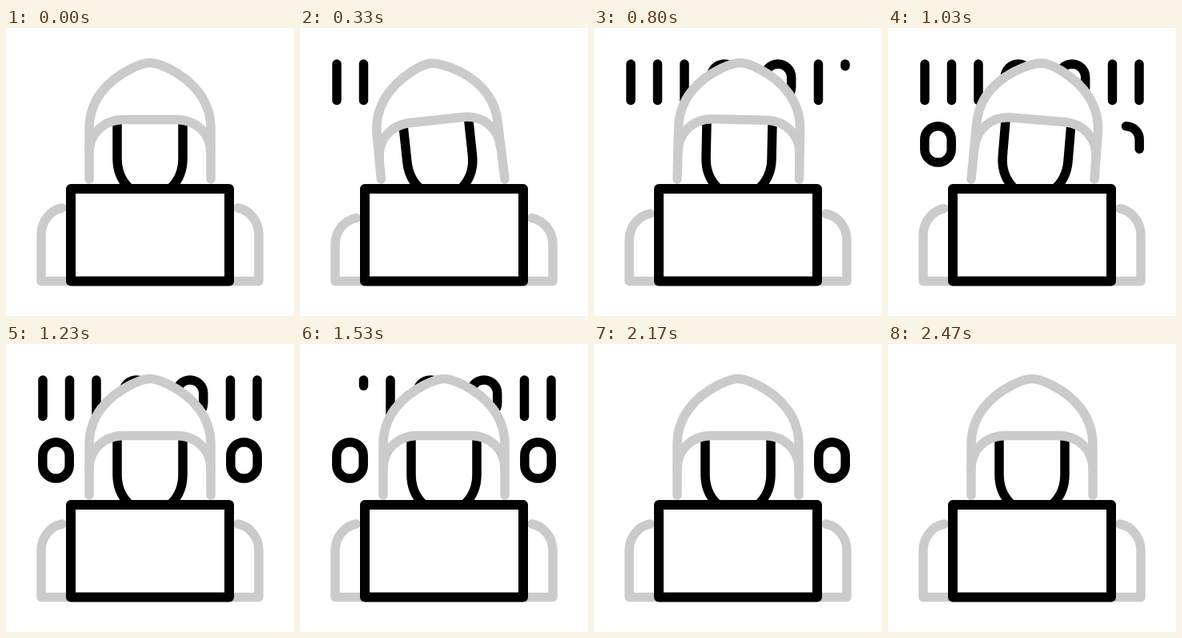
These frames come from a looping animation (360 by 360 pixels, 2.5 s). An HTML page with a canvas:

```html
<!DOCTYPE html>
<html lang="en">
<head>
<meta charset="utf-8">
<style>
  html, body { margin: 0; width: 100%; height: 100%; overflow: hidden; background: #fff; }
  canvas { display: block; width: 360px; height: 360px; }
</style>
</head>
<body>
<canvas id="stage" width="360" height="360"></canvas>
<script>
const ctx = document.getElementById('stage').getContext('2d');
const LOOP = 2500;
const BLACK = '#000', GRAY = '#cbcbcb';
const DRAW_TIME = 68;
const DIGIT_HEIGHT = 45.4;

const clamp = v => Math.max(0, Math.min(1, v));
const smooth = v => v * v * (3 - 2 * v);

// Eased value between [time, value] keys
function track(keys, t) {
  for (let i = 1; i < keys.length; i++) {
    const [t0, a] = keys[i - 1], [t1, b] = keys[i];
    if (t < t1) return a + (b - a) * smooth(clamp((t - t0) / (t1 - t0)));
  }
  return keys[keys.length - 1][1];
}

const TILT = [[70, 0], [580, -11.8], [930, 7], [1200, 0]];
const DROP = [[70, 0], [380, 13.5], [520, 13], [1120, 0]];

const RADIUS = 16.7;
const one = x => ({ x, top: 45, length: DIGIT_HEIGHT });
const zero = (x, top, turn) =>
  ({ x, top, turn, length: 2 * Math.PI * RADIUS + 2 * (DIGIT_HEIGHT - 2 * RADIUS) });

// turn: 1 is clockwise, -1 counterclockwise
const DIGITS = [
  one(46), one(79.5), one(113),
  zero(163, 45, -1), zero(230, 45, -1),
  one(280.5), one(314),
  zero(62.5, 122.7, -1), zero(297.5, 122.7, 1)
];

function stroke(color) {
  ctx.strokeStyle = color;
  ctx.stroke();
}

function drawDigit(d, shown) {
  if (shown <= 0) return;
  ctx.save();
  ctx.translate(d.x, d.top);
  ctx.beginPath();
  ctx.moveTo(0, 0);
  if (d.turn) {
    ctx.scale(d.turn, 1);
    ctx.arc(0, RADIUS, RADIUS, -Math.PI / 2, 0);
    ctx.arc(0, DIGIT_HEIGHT - RADIUS, RADIUS, 0, Math.PI);
    ctx.arc(0, RADIUS, RADIUS, Math.PI, Math.PI * 1.5);
  } else {
    ctx.lineTo(0, DIGIT_HEIGHT);
  }
  if (shown < 1) ctx.setLineDash([d.length * shown, d.length * 2]);
  stroke(BLACK);
  ctx.restore();
}

function drawShoulder(side, drop) {
  const x = v => 180 + side * v;
  ctx.beginPath();
  ctx.moveTo(x(110), 225 + drop);
  ctx.bezierCurveTo(x(124), 227.5 + drop, x(136), 241 + drop, x(136), 258 + drop);
  ctx.lineTo(x(136), 316.5);
  ctx.lineTo(x(104), 316.5);
  stroke(GRAY);
}

// Rotates points around the neck, then slides them sideways
function leaning(degrees, shift) {
  const a = degrees * Math.PI / 180, c = Math.cos(a), s = Math.sin(a);
  return (x, y) => {
    const dx = x - 180, dy = y - 190;
    return [180 + dx * c - dy * s + shift, 190 + dx * s + dy * c];
  };
}

function drawHead(tilt) {
  const p = leaning(tilt, tilt * 0.24);
  const f = leaning(tilt, tilt * 0.4);
  const leftEnd = 104 + Math.min(0, tilt) * 0.42;
  const rightEnd = 256 + Math.max(0, tilt) * 0.42;

  const hood = new Path2D();
  hood.moveTo(leftEnd, 189);
  hood.lineTo(...p(104, 126));
  hood.bezierCurveTo(...p(104, 91), ...p(126, 66), ...p(156, 51));
  hood.bezierCurveTo(...p(165, 46.5), ...p(172, 43.5), ...p(180, 43.5));
  hood.bezierCurveTo(...p(188, 43.5), ...p(195, 46.5), ...p(204, 51));
  hood.bezierCurveTo(...p(234, 66), ...p(256, 91), ...p(256, 126));
  hood.lineTo(rightEnd, 189);
  ctx.fillStyle = '#fff';
  ctx.fill(hood);

  ctx.lineCap = 'butt';
  for (const side of [-1, 1]) {
    const q = (x, y) => f(180 + side * x, y);
    ctx.beginPath();
    ctx.moveTo(...q(41, 116));
    ctx.lineTo(...q(41, 163));
    ctx.bezierCurveTo(...q(41, 178), ...q(36, 190), ...q(27, 199));
    ctx.lineTo(...q(18, 208));
    stroke(BLACK);
  }
  ctx.lineCap = 'round';

  ctx.strokeStyle = GRAY;
  ctx.stroke(hood);
  ctx.beginPath();
  ctx.moveTo(...p(104, 156));
  ctx.bezierCurveTo(...p(104, 132.5), ...p(122, 114.5), ...p(147, 114.5));
  ctx.lineTo(...p(213, 114.5));
  ctx.bezierCurveTo(...p(238, 114.5), ...p(256, 132.5), ...p(256, 156));
  stroke(GRAY);
}

function drawLaptop() {
  ctx.beginPath();
  ctx.rect(81, 201, 198, 115.5);
  ctx.fillStyle = '#fff';
  ctx.fill();
  ctx.lineWidth = 12;
  stroke(BLACK);
}

function render(t) {
  ctx.fillStyle = '#fff';
  ctx.fillRect(0, 0, 360, 360);
  ctx.lineWidth = 11.5;
  ctx.lineCap = ctx.lineJoin = 'round';

  DIGITS.forEach((d, i) => {
    const drawn = clamp((t - 155 - i * 107) / DRAW_TIME);
    const erased = clamp((t - 1374 - i * 100) / DRAW_TIME);
    drawDigit(d, drawn * (1 - erased));
  });

  const drop = track(DROP, t);
  drawShoulder(-1, drop);
  drawShoulder(1, drop);
  drawHead(track(TILT, t));
  drawLaptop();
}

const start = performance.now();
function tick() {
  render((performance.now() - start) % LOOP);
  requestAnimationFrame(tick);
}
tick();
</script>
</body>
</html>
```
